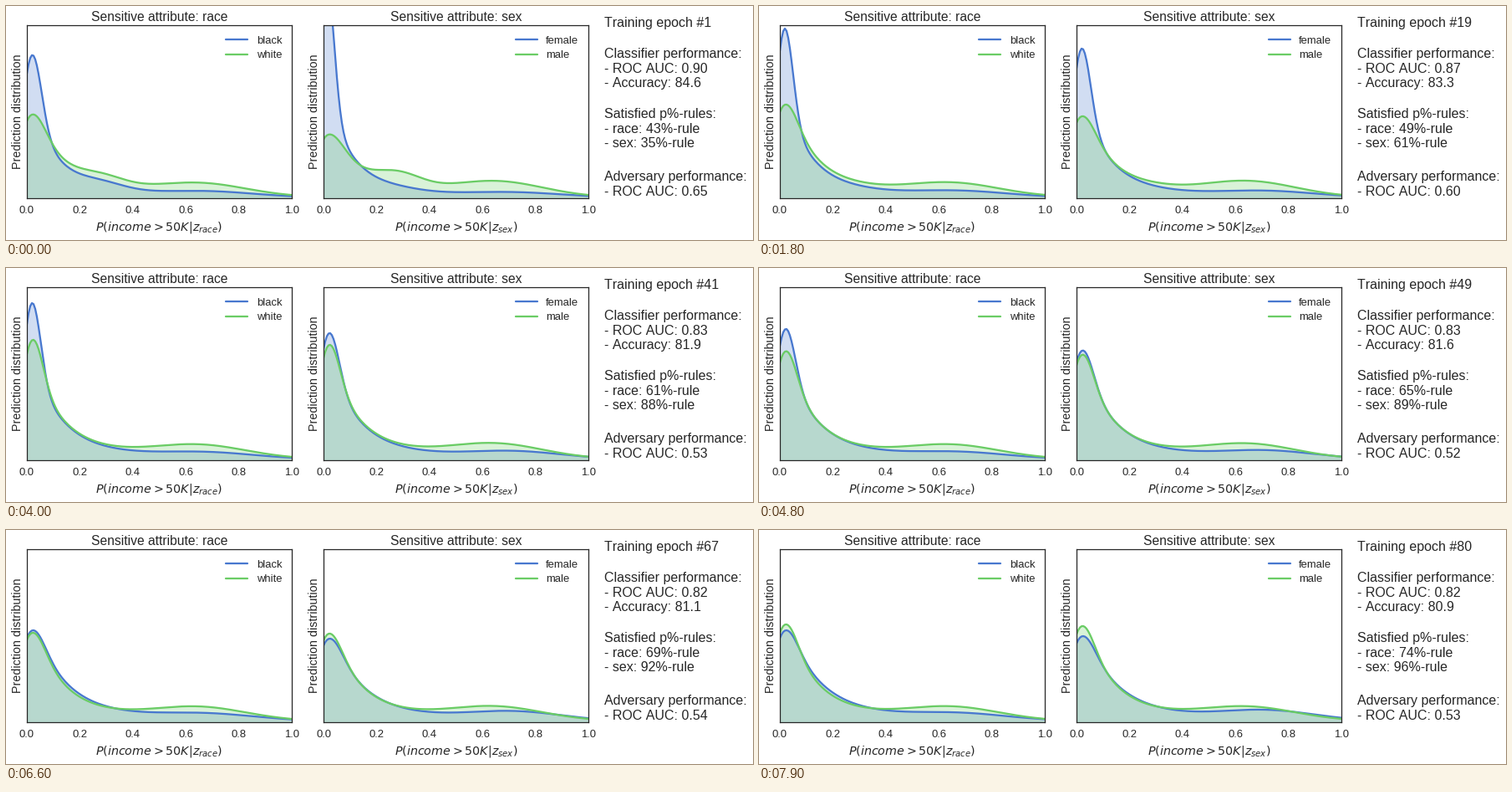
These frames come from a looping animation (894 by 280 pixels, 8000 ms). A matplotlib script:

```python
import numpy as np
import matplotlib.pyplot as plt
from matplotlib.animation import FuncAnimation

W, H, DPI = 894, 280, 72
FRAMES, STEP_MS = 80, 100
BLUE, GREEN, INK = "#4878CF", "#6ACC65", "0.15"
TOP, BOTTOM, PLOT_W = 23, 230, 317
PLOT_H = BOTTOM - TOP

plt.rcParams.update({
    "font.family": "Liberation Sans",
    "mathtext.fontset": "dejavusans",
    "text.color": INK,
    "text.kerning_factor": 6,
    "axes.edgecolor": INK,
    "axes.linewidth": 1.25,
    "xtick.color": INK,
    "lines.linewidth": 2.275,
    "lines.solid_capstyle": "round",
})

# Key epochs, counted from zero, for peak heights and scores
EPOCHS = np.array([0, 18, 30, 40, 57, 66, 79])

# Text lines: baseline y, template, value at each key epoch
READOUT = [
    (25, "Training epoch #{:.0f}", EPOCHS + 1),
    (62, "Classifier performance:", None),
    (80, "- ROC AUC: {:.2f}", [.90, .87, .85, .83, .82, .82, .82]),
    (97, "- Accuracy: {:.1f}", [84.6, 83.3, 82.7, 81.9, 81.3, 81.1, 80.9]),
    (134, "Satisfied p%-rules:", None),
    (152, "- race: {:.0f}%-rule", [43, 49, 58, 61, 70, 69, 74]),
    (169, "- sex: {:.0f}%-rule", [35, 61, 76, 88, 91, 92, 96]),
    (209, "Adversary performance:", None),
    (227, "- ROC AUC: {:.2f}", [.65, .60, .56, .53, .51, .54, .53]),
]

XS = np.linspace(0, 1, 160)

fig = plt.figure(figsize=(W / DPI, H / DPI), dpi=DPI, facecolor="white")


def at_epoch(values, epoch):
    return np.interp(epoch, EPOCHS, values)


def bell(center, width):
    return np.exp(-((XS - center) / width) ** 2 / 2)


def density(peak, spread, shoulder, hump, center):
    """Narrow spike on a long tail, with a shoulder and a far hump."""
    tail = min(92, .82 * peak)
    mode = .04 - .00011 * peak
    spike_width = .042 * np.sqrt(110 / peak)
    core = (peak - tail) * bell(mode, spike_width) + tail / (1 + (XS / spread) ** 2)
    core /= 1 + np.exp(-(XS + .035) / .015)
    core *= peak / core.max()
    return core + shoulder * bell(.28, .09) + hump * bell(center, .18)


class Group:
    """Spread and hump run from a first to a last value; the shoulder fades."""

    def __init__(self, label, color, peaks, spread, shoulder, hump, center):
        self.label, self.color, self.peaks = label, color, peaks
        self.spread, self.shoulder = spread, shoulder
        self.hump, self.center = hump, center

    def add_to(self, ax):
        self.line, = ax.plot([], [], color=self.color, label=self.label)
        self.fill, = ax.fill([0, 1, 1], [0, 0, 0], color=self.color,
                             alpha=.25, lw=0)

    def update(self, epoch):
        span = 0, FRAMES - 1
        ys = density(at_epoch(self.peaks, epoch),
                     np.interp(epoch, span, self.spread),
                     self.shoulder * np.exp(-epoch / 8),
                     np.interp(epoch, span, self.hump), self.center)
        self.line.set_data(XS, ys)
        self.fill.set_xy(np.column_stack([np.r_[0, XS, 1], np.r_[0, ys, 0]]))


def put_text(x, y, text, size, **kw):
    return fig.text(x / W, 1 - y / H, text, fontsize=size, va="baseline", **kw)


def panel(left, name, groups):
    ax = fig.add_axes([left / W, 1 - BOTTOM / H, PLOT_W / W, PLOT_H / H])
    for group in groups:
        group.add_to(ax)
    ax.set(xlim=(0, 1), ylim=(0, PLOT_H), yticks=[])
    ax.set_xticks(np.linspace(0, 1, 6))
    ax.tick_params(length=0, pad=9.1, labelsize=13)
    ax.legend(loc="upper right", bbox_to_anchor=(1, 1 - .9 / PLOT_H),
              frameon=False, fontsize=13, labelspacing=.43)
    mid = left + PLOT_W / 2
    put_text(mid, 18, f"Sensitive attribute: {name}", 15.6, ha="center")
    put_text(mid, 269, rf"$P(income>50K|z_{{{name}}})$", 14.3, ha="center")
    put_text(left - 7, (TOP + BOTTOM) / 2, "Prediction distribution", 14.3,
             ha="center", rotation=90, rotation_mode="anchor")


race = [
    Group("black", BLUE, [171, 203, 212, 188, 122, 110, 110],
          spread=(.115, .155), shoulder=8, hump=(6, 7), center=.68),
    Group("white", GREEN, [100, 112, 135, 144, 115, 107, 117],
          spread=(.138, .138), shoulder=12, hump=(15, 15), center=.65),
]
sex = [
    Group("female", BLUE, [255, 179, 170, 152, 108, 100, 103],
          spread=(.115, .155), shoulder=2, hump=(5, 11), center=.72),
    Group("male", GREEN, [76, 98, 122, 138, 113, 106, 115],
          spread=(.138, .138), shoulder=18, hump=(18, 15), center=.65),
]
panel(25, "race", race)
panel(380, "sex", sex)
lines = [(put_text(716, y, text, 16), text, values) for y, text, values in READOUT]


def draw(epoch):
    for group in race + sex:
        group.update(epoch)
    for artist, text, values in lines:
        if values is not None:
            artist.set_text(text.format(at_epoch(values, epoch)))
    return []


anim = FuncAnimation(fig, draw, frames=FRAMES, interval=STEP_MS,
                     repeat=True, repeat_delay=0)
plt.show()
```
